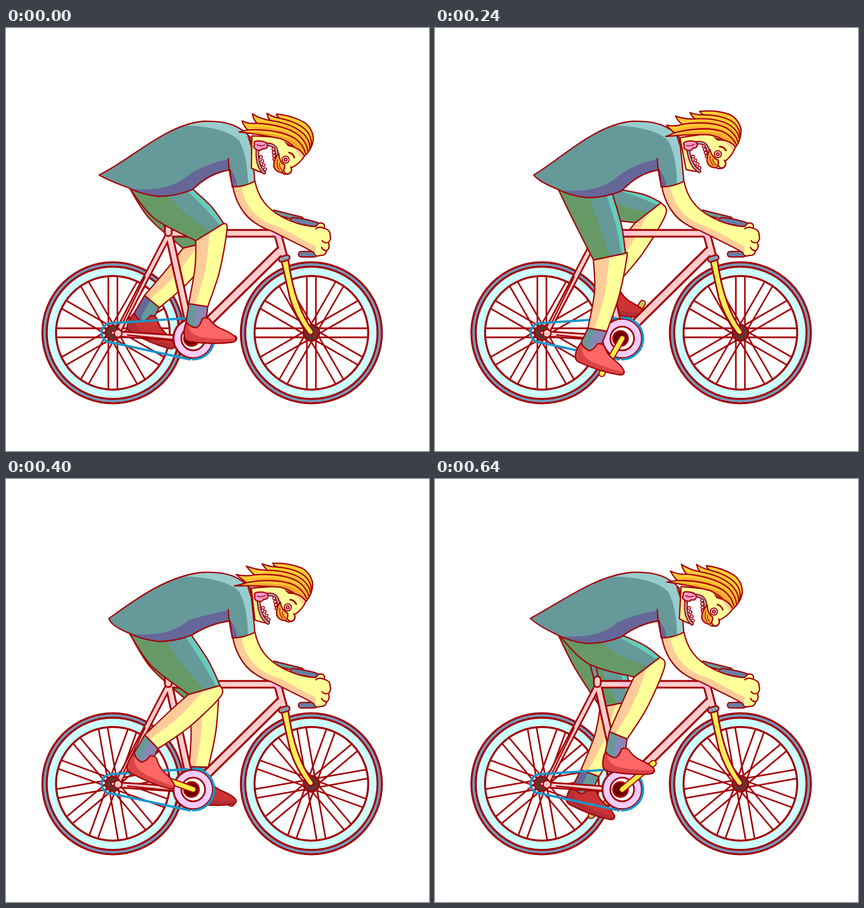
Write an HTML page with a canvas that moves like this. It is 748x748 px and loops after 720 ms.

```html
<!DOCTYPE html>
<html lang="en">
<head>
<meta charset="utf-8">
<title>Cyclist</title>
<style>
html, body { margin: 0; width: 100%; height: 100%; overflow: hidden; background: #fff; }
canvas { display: block; width: 100vw; height: 100vh; }
</style>
</head>
<body>
<canvas id="stage" width="748" height="748"></canvas>
<script>
const ctx = document.getElementById('stage').getContext('2d');
const STEP = 80, COUNT = 9, TURN = 360 / COUNT;
const INK = '#a20006', TEAL = '#669999', VIOLET = '#666699', PINK = '#ffcccc', SKIN = '#ffff99', TAN = '#ffcc99';
const REAR = [189, 539], FRONT = [540, 539], AXLE = [331, 549], HIP = [255, 288];
const THIGH = 128, SHIN = 131, CRANK = 72;

const cos = deg => Math.cos(deg * Math.PI / 180);
const sin = deg => Math.sin(deg * Math.PI / 180);
const wave = (i, mean, size, peak) => mean + size * cos(TURN * (i - peak));
const mix = (a, b, t) => [a[0] + (b[0] - a[0]) * t, a[1] + (b[1] - a[1]) * t];
const move = (p, dir, d) => [p[0] + dir[0] * d, p[1] + dir[1] * d];
const polar = (c, r, deg) => move(c, [cos(deg), sin(deg)], r);
const unit = ([x, y]) => [x / Math.hypot(x, y), y / Math.hypot(x, y)];
const toward = (a, b) => unit([b[0] - a[0], b[1] - a[1]]);
const ahead = ([x, y]) => [y, -x];

function addCurve(path, pts) {
  path.lineTo(...pts[0]);
  for (let i = 0; i < pts.length - 1; i++) {
    const a = pts[Math.max(i - 1, 0)], b = pts[i], c = pts[i + 1], d = pts[Math.min(i + 2, pts.length - 1)];
    path.bezierCurveTo(b[0] + (c[0] - a[0]) / 6, b[1] + (c[1] - a[1]) / 6,
      c[0] - (d[0] - b[0]) / 6, c[1] - (d[1] - b[1]) / 6, c[0], c[1]);
  }
}

// Closed shape of smooth runs joined by corners
function blob(...runs) {
  const path = new Path2D();
  path.moveTo(...runs[0][0]);
  runs.forEach(run => addCurve(path, run));
  path.closePath();
  return path;
}

const asPath = d => d instanceof Path2D ? d : new Path2D(d);
function fill(d, color) {
  ctx.fillStyle = color;
  ctx.fill(asPath(d));
}
function line(d, color = INK, width = 2.3) {
  ctx.strokeStyle = color;
  ctx.lineWidth = width;
  ctx.stroke(asPath(d));
}
function paint(d, color, shades = [], width) {
  const path = asPath(d);
  fill(path, color);
  ctx.save();
  ctx.clip(path);
  shades.forEach(shade => fill(...shade));
  ctx.restore();
  line(path, INK, width);
}
function tube(d, color, width, edge = 3) {
  line(d, INK, width);
  line(d, color, width - 2 * edge);
}
function disc([x, y], r, color, width = 3.5) {
  const path = new Path2D();
  path.arc(x, y, r, 0, 7);
  fill(path, color);
  line(path, INK, width);
}

function wheel(c, turn) {
  disc(c, 124.7, '#7799bb');
  disc(c, 117, '#ccffff');
  disc(c, 100.5, '#fff');
  ctx.save();
  ctx.translate(...c);
  ctx.rotate(turn * Math.PI / 180);
  for (let k = 0; k < 6; k++) {
    line('M-98-8H98M-98 8H98', INK, 2.8);
    ctx.rotate(Math.PI / 6);
  }
  ctx.restore();
}

function crank(angle, color) {
  tube(`M${AXLE}L${polar(AXLE, CRANK, angle)}`, color, 12, 2);
}

function shoe([x, y], angle, color, shade) {
  ctx.save();
  ctx.translate(x, y);
  ctx.rotate(angle * Math.PI / 180);
  paint('M-17 2Q-22 12-21 26Q-20 36-8 37Q32 42 62 38Q73 37 70 29Q63 21 45 14Q32 9 23-4Q17-7 11-4Q8 8 1 12Q-11 11-17 2Z',
    color, [['M-30-5L-14 6Q-12 25 10 29Q45 34 75 30V50H-30Z', shade]]);
  ctx.restore();
}

// Two-bone reach from the hip, knee bent forward
function kneeFor(ankle) {
  const d = Math.min(Math.hypot(ankle[0] - HIP[0], ankle[1] - HIP[1]), THIGH + SHIN - 1);
  const along = (d * d + THIGH * THIGH - SHIN * SHIN) / (2 * d);
  const dir = toward(HIP, ankle);
  return move(move(HIP, dir, along), ahead(dir), Math.sqrt(THIGH * THIGH - along * along));
}

function leg(phase, waist, far) {
  const foot = [290 + 46 * cos(phase) + 10 * sin(phase), 513 + 5 * cos(phase) + 56 * sin(phase)];
  const tilt = 11 - 11 * cos(phase);
  const ankle = polar(foot, 28, tilt - 82);
  const knee = kneeFor(ankle);
  const thighDir = toward(HIP, knee), shinDir = toward(knee, ankle);
  const thighN = ahead(thighDir), shinN = ahead(shinDir);
  const hemN = unit(mix(shinN, thighN, .62));
  const hemF = move(knee, hemN, 29), hemB = move(knee, hemN, -29);
  const cap = move(knee, unit(mix(shinN, thighN, .3)), 31);
  const middle = mix(knee, ankle, .5);
  const shinF = move(middle, shinN, 28), calf = move(middle, shinN, -16);
  const ankF = move(ankle, shinN, 17), ankB = move(ankle, shinN, -17);

  paint(blob([hemF, cap, shinF, ankF], [ankB, calf, hemB]), SKIN, [
    [blob([hemB, calf, ankB], [mix(ankB, ankF, .35), mix(calf, shinF, .42), mix(hemB, hemF, .5)]), TAN]
  ]);

  const cuffF = polar(foot, 18, tilt - 5), cuffB = polar(foot, 18, tilt + 168), sole = polar(foot, 14, tilt + 90);
  paint(blob([ankF, cuffF], [cuffF, sole, cuffB], [cuffB, ankB]), far ? TEAL : '#8888b4',
    [[blob([ankB, mix(ankB, ankF, .4)], [mix(cuffB, cuffF, .4), sole, cuffB]), far ? VIOLET : TEAL]]);
  shoe(foot, tilt, far ? '#cc3333' : '#ff6666', far ? '#b32d35' : '#d94444');

  const root = [217, waist - 2], lap = [293 + 45 * thighDir[0], waist + 2];
  const sag = Math.max(0, thighDir[0] - .4) * 36;
  const under = move(mix(root, hemB, .45), thighN, -sag), over = move(mix(lap, hemF, .55), thighN, 4);
  const strip = t => blob([lap, over, hemF], [mix(hemF, hemB, t), mix(over, under, t), mix(lap, root, t)]);
  paint(blob([root, under, hemB], [hemF, over, lap]), '#669966', [[strip(.48), TEAL], [strip(.12), '#66ccbb']]);
}

function bikeFrame() {
  const main = new Path2D('M288 363H476Q481 364 483 373L491 403M287 360L323 522');
  const down = new Path2D('M484 395L347 530');
  const stays = new Path2D('M286 368L198 537M198 541L302 548');
  line(stays, INK, 12);
  line(main, INK, 15);
  line(down, INK, 18);
  line(stays, PINK, 6);
  line(main, PINK, 8.5);
  line(down, PINK, 11);
  line('M246 440L207 520M215 543L294 551');
  line('M331 363h12M473 363q7 0 9 7', '#ffb9dd', 8);
  tube('M287 355v7', PINK, 15);
}

function drivetrain() {
  disc(REAR, 13, '#663333', 2.5);
  disc([198, 540], 7, PINK, 2.5);
  disc([189, 539], 3, PINK, 2);
  disc(AXLE, 35, '#f5ccff');
  disc(AXLE, 21, '#fff', 3);
  disc([328, 549], 13, '#660000');
  line('M321 513L186 522A17 17 0 0 0 186 556L325 586M331 512A37 37 0 0 1 331 586', '#1696cb', 4);
}

function arms() {
  tube('M474 326L522 338', TEAL, 10, 2.3);
  paint('M404 282Q412 326 438 343L482 360L490 350L430 280Z', TAN);
  tube('M508 340Q535 343 553 350', '#6680a6', 12, 2.3);
  tube('M522 400H545', '#6680a6', 12, 2.3);
  paint('M440 270C446 300 461 320 490 335C514 347 534 351 548 351Q553 342 561 346Q565 350 562 354Q574 357 573 366' +
        'Q576 374 570 379Q574 389 567 394Q565 403 556 402Q547 406 544 397L530 389C510 379 492 370 470 359C424 344 407 312 401 280Z',
    SKIN, [['M400 278L415 276C422 316 444 340 478 350C505 362 525 376 548 386L545 404L470 372L400 330Z', TAN]]);
  line('M562 354Q554 350 548 355M570 379Q562 381 559 376M567 394Q560 393 558 388');
}

function shirt(tx, ty, waist) {
  const low = waist + 15, belly = waist + 3;
  paint(`M${tx} ${ty}C222 ${ty - 28} 282 171 348 165C392 163 414 174 432 193Q437 235 440 271Q422 281 400 281L396 251` +
    `Q360 256 330 ${belly}Q300 ${low} 270 ${low}Q240 ${low - 3} 217 ${waist}Q185 ${(ty + waist) / 2} ${tx} ${ty}Z`, TEAL, [
    ['M300 172Q350 160 400 168L436 195L441 272L428 276Q427 225 412 199Q385 172 300 172Z', '#99cccc'],
    [`M225 ${waist + 2}Q290 ${low - 8} 322 ${waist - 22}Q352 240 391 233L394 246Q412 270 408 285L260 ${low + 6}Z`, VIOLET]
  ]);
  line('M393 231Q395 262 401 281M428 191L433 207');
}

function head(angle, sway) {
  ctx.save();
  ctx.translate(450, 200);
  ctx.rotate(angle * Math.PI / 180);
  ctx.translate(-450, -200);

  paint('M434 192L438 249Q450 254 461 256L447 230L443 212L460 203Q478 203 482 218Q478 238 488 249Q494 257 504 254' +
        'Q511 249 508 243Q523 234 530 219L510 190Z', SKIN,
    [['M432 190L447 214L447 232L455 256L447 256Q440 230 432 190Z', '#f3e68c'],
     ['M505 190L532 216L524 226Q515 208 498 203Z', TAN]]);
  tube('M446 214Q446 244 461 255', '#99bbcc', 6.5, 2);
  tube('M460 205Q479 202 481 222', '#99bbcc', 6.5, 2);
  for (let k = 0; k < 4; k++) {
    disc([453 + 3 * k, 228 + 7 * k], 2.6, '#ffe3ee', 1.6);
    disc([474 + k, 212 + 6 * k], 2.6, '#ffe3ee', 1.6);
  }
  paint('M440 207Q437 200 446 200Q462 199 463 207Q463 214 455 213Q451 219 443 215Q437 212 440 207Z', '#ff99cc');
  line('M444 207Q452 210 458 206', INK, 1.5);
  paint('M484 219Q475 231 477 243Q482 253 492 252Q498 247 496 239Q486 234 484 219Z', '#ffbb33',
    [['M484 224Q478 240 489 253H475V230Z', '#f39a2c']]);
  line('M483 230Q481 242 488 249M487 236Q486 243 492 248', INK, 1.3);
  line('M496 250Q500 257 507 252Q511 246 507 241');
  disc([497, 229], 6.2, '#ffeef5', 2);
  disc([497, 229], 2.6, '#cc99cc', 1.8);
  line('M502 216Q509 217 512 224', INK, 3);

  const [a, b, c] = [sway, sway * .8, sway * .4];
  paint(`M${412 + a} 187Q450 188 486 193Q502 198 511 206Q522 209 530 220Q542 207 543 190Q541 171 525 161` +
    `Q502 150 474 150Q476 155 481 157Q468 156 ${458 + c} 150Q459 157 464 162Q446 161 ${433 + b} 153Q434 163 441 169` +
    `Q426 172 ${416 + a} 167Q418 176 426 182Q418 185 ${412 + a} 187Z`, '#ffcc33', [
    ['M415 187Q450 181 490 189Q516 193 530 218L520 220L480 198L410 194Z', '#f7a52b'],
    ['M426 177Q470 171 505 184Q526 195 534 211L530 216Q516 192 485 185Q450 179 426 177Z', '#ffb02e'],
    ['M441 168Q490 163 518 180Q535 193 537 206Q526 186 500 178Q470 171 441 168Z', '#ffb02e']
  ]);
  line('M426 182Q480 176 510 190Q526 200 531 215M441 169Q492 168 518 185Q533 198 535 211M464 162Q508 165 527 183' +
       'Q538 194 538 206M481 157Q520 162 534 180Q541 191 540 201');
  fill('M492 197L513 207L499 205Z', INK);
  ctx.restore();
}

function draw(i) {
  const phase = i * TURN, waist = wave(i, 279, 10, 1.7);
  ctx.fillStyle = '#fff';
  ctx.fillRect(0, 0, 748, 748);
  ctx.lineCap = ctx.lineJoin = 'round';

  wheel(REAR, i * 10);
  wheel(FRONT, i * 10);
  crank(phase + 180, '#cfc455');
  leg(phase + 180, waist, true);
  tube('M275 312L285 352', TEAL, 11, 2.3);
  bikeFrame();
  disc(FRONT, 14, '#663333');
  paint('M487 411L499 409Q505 452 516 483Q526 513 544 537Q542 545 535 541Q511 510 502 478Z', '#ffee55', [], 2.8);
  tube('M487 409L497 406', '#88a0bb', 12, 2.8);
  drivetrain();
  crank(phase, '#ffee44');
  leg(phase, waist, false);
  arms();
  // The shirt tail flaps three times per turn of the cranks
  shirt(wave(i, 173, 9, 5), 251 + 9 * cos(phase * 3), waist);
  head(wave(i, 0, 7, 7.8), wave(i, -4, 4, 1.2));
}

let shown = -1;
function tick() {
  const i = Math.floor(performance.now() / STEP) % COUNT;
  if (i !== shown) draw(shown = i);
  requestAnimationFrame(tick);
}
tick();
</script>
</body>
</html>
```
